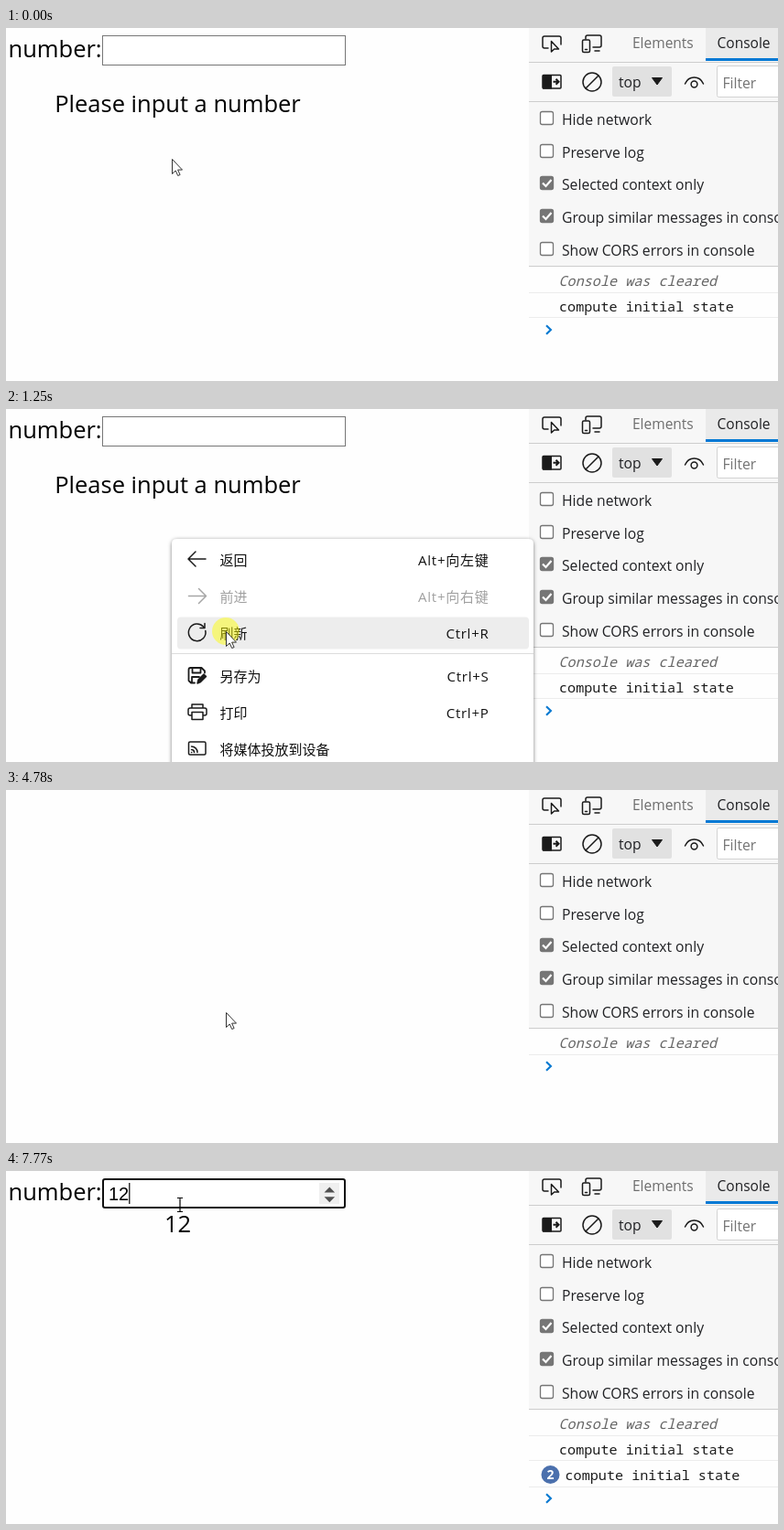
An HTML page that plays this animation: 843x386 px, repeating every 8 s.

```html
<!DOCTYPE html>
<html lang="en">
<head>
<meta charset="utf-8">
<title>Number input and console</title>
<style>
  html, body { margin: 0; width: 100%; height: 100%; overflow: hidden; background: #fefefe; }
  svg { display: block; width: 843px; height: 386px; font-family: "Open Sans", "Noto Sans", sans-serif; }
  text { white-space: pre; }
  .page { font-size: 25.5px; fill: #000; }
  .tool { font-size: 15.7px; fill: #202124; }
  .dim { fill: #6e6e6e; }
  .log { font: 15.15px "Noto Sans Mono", "DejaVu Sans Mono", monospace; fill: #1b1b1b; }
  .cleared { font-style: italic; fill: #666; }
  .label { font-size: 15px; font-family: "Noto Sans CJK SC", "Noto Sans CJK", sans-serif; }
  .keys { font-size: 15px; font-family: "Open Sans", "Noto Sans CJK SC", "Noto Sans CJK", sans-serif; letter-spacing: .75px; text-anchor: end; }
  .icon { fill: none; stroke: #1b1b1b; stroke-width: 1.5; stroke-linejoin: round; stroke-linecap: round; }
</style>
</head>
<body>
<svg viewBox="0 0 843 386" xmlns="http://www.w3.org/2000/svg">
  <defs>
    <filter id="shadow" x="-5%" y="-5%" width="110%" height="115%">
      <feDropShadow dx="0" dy="1" stdDeviation="2.2" flood-opacity=".5"/>
    </filter>
  </defs>
  <rect width="843" height="386" fill="#fefefe"/>

  <g id="form">
    <text class="page" x="2.5" y="32">number:</text>
    <rect id="field" fill="#fff"/>
    <g id="spinner">
      <rect x="342" y="13" width="22" height="23" fill="#efefef"/>
      <path d="M347.5 23.5l5.8-6 5.8 6zM347.5 28.2l5.8 6 5.8-6z" fill="#505050"/>
    </g>
    <text id="typed" x="112" y="32" font-size="20" font-family="Liberation Sans, Arial, sans-serif"></text>
    <rect id="caret" y="13" width="1.2" height="23"/>
  </g>
  <text id="output" class="page" x="187.5" text-anchor="middle"></text>

  <g id="tools">
    <rect x="571" width="272" height="261" fill="#f7f7f7"/>
    <rect x="764" width="79" height="36" fill="#eaeaea"/>
    <path d="M571 37.5h272M571 80.5h272M571 260.5h272" stroke="#cdcdcd"/>
    <rect x="764" y="33" width="79" height="3" fill="#0078d4"/>
    <text class="tool dim" x="684" y="22" style="font-size:15.5px">Elements</text>
    <text class="tool" x="776.5" y="22" style="font-size:15.5px">Console</text>
    <g class="icon">
      <path d="M592 22h-4q-2 0-2-2v-9q0-2 2-2h16q2 0 2 2v7"/>
      <path d="M595.5 14.5v11.5l3.2-3h4.8z" fill="#fff"/>
      <path d="M633 12v-2q0-2 2-2h13q2 0 2 2v9q0 2-2 2h-7M643 25h5"/>
      <rect x="629.5" y="13" width="8" height="13.5" rx="1.5"/>
      <path d="M632.5 23.5h2"/>
      <rect x="586" y="51.5" width="20" height="14.5" rx="1"/>
      <circle cx="640" cy="59" r="10"/>
      <path d="M633 66l14-14"/>
      <path d="M741.5 61q3-7 10-7t10 7"/>
      <circle cx="751.5" cy="61.5" r="3.4"/>
    </g>
    <rect x="586" y="51" width="10" height="15.5" fill="#1b1b1b"/>
    <path d="M597.5 58.8h6M600.5 55.8l3 3-3 3" fill="none" stroke="#1b1b1b" stroke-width="2"/>
    <rect x="662" y="42" width="65" height="33" rx="2" fill="#e1e1e1"/>
    <text class="tool" x="669" y="65">top</text>
    <path d="M705.5 54.5h11l-5.5 7.5z" fill="#1b1b1b" stroke="#1b1b1b" stroke-linejoin="round"/>
    <rect x="776.5" y="41.5" width="80" height="34" rx="2" fill="#fff" stroke="#d2d2d2"/>
    <text class="tool" x="782.5" y="65.5" style="fill:#757575">Filter</text>
  </g>

  <g id="console">
    <g id="rowCleared"><text class="log cleared" x="603.5" y="282">Console was cleared</text><path d="M571 289.5h272" stroke="#ececec"/></g>
    <g id="rowFirst"><text class="log" x="604" y="310">compute initial state</text><path d="M571 316.5h272" stroke="#ececec"/></g>
    <g id="rowSecond"><text id="second" class="log" y="338">compute initial state</text><path d="M571 345.5h272" stroke="#ececec"/></g>
    <g id="badge">
      <circle cx="594.5" cy="332" r="10" fill="#4b70ad"/>
      <text x="594.5" y="337" font-size="14" font-weight="700" fill="#fff" text-anchor="middle">2</text>
    </g>
    <path id="prompt" d="M590-4.7l4.9 4.7-4.9 4.7" fill="none" stroke-width="2.2"/>
  </g>

  <g id="menu">
    <path d="M181 400V148q0-6 6-6h383q6 0 6 6v252z" fill="#fff" filter="url(#shadow)"/>
    <rect id="hover" x="187" width="384" height="35" rx="4" fill="#ededed"/>
    <path d="M181 267.5h395" stroke="#dcdcdc"/>
    <g id="items"></g>
    <g class="icon">
      <path d="M218 164h-18.5M207 156l-8 8 8 8"/>
      <path d="M199.5 204.5h18.5M210.5 196.5l8 8-8 8" stroke="#a6a6a6"/>
      <path d="M215.5 238a9.3 9.3 0 1 0 2.3 4.5M217 234.5v5h-5"/>
      <path d="M206 299.5h-4l-2.5-2.5v-12q0-2 2-2h12l3.5 3.5v2M203.5 283.5v5h9v-5M203 299v-6h8" stroke-width="1.8"/>
      <path d="M209 300l1-4 6-6 2.500 2.500-6 6z" fill="#1b1b1b"/>
      <path d="M203 327v-4h12v4M203 335h-2q-2 0-2-2v-4q0-2 2-2h16q2 0 2 2v4q0 2-2 2h-2M203 331.500h12v8h-12z"/>
      <rect x="199.5" y="364" width="18.5" height="14" rx="1.5"/>
      <path d="M202.500 369a6.500 6.500 0 0 1 6.500 6.500M202.500 372.500a3 3 0 0 1 3 3M202.500 375.500h.3"/>
    </g>
  </g>

  <circle id="ring" r="15" fill="#ff0" fill-opacity=".47"/>
  <path id="arrow" d="M.5.5v16l3.700-3.500 2.500 5.500 2.400-1-2.500-5.400h4.900z" fill="#fff" stroke="#333"/>
  <path id="beam" d="M-3-7.500h2.500l.5.500.5-.5h2.500M0-7v14M-3 7.500h2.500l.5-.5.5.5h2.500" fill="none" stroke="#000" stroke-width="1.2"/>
</svg>

<script>
const LOOP = 8000;
const el = id => document.getElementById(id);
const show = (id, on) => { el(id).style.display = on ? "" : "none"; };
const set = (id, attrs) => { for (const k in attrs) el(id).setAttribute(k, attrs[k]); };
const within = (t, from, to) => t >= from && t < to;

function buildOptions() {
  const options = [
    ["Hide network", 99], ["Preserve log", 135], ["Selected context only", 170, true],
    ["Group similar messages in console", 206, true], ["Show CORS errors in console", 242]
  ];
  el("tools").innerHTML += options.map(([name, y, on]) => `
    <rect x="583.5" y="${y - 7.5}" width="14" height="14" rx="2" stroke="#767676" stroke-width="1.3" fill="${on ? "#767676" : "#fff"}"/>
    ${on ? `<path d="M586 ${y - .5}l3.5 3.5 6-7" fill="none" stroke="#fff" stroke-width="2.2"/>` : ""}
    <text class="tool" x="607" y="${y + 7}">${name}</text>`).join("");
}

function buildMenu() {
  const items = [
    ["返回", "Alt+向左键", 165], ["前进", "Alt+向右键", 205], ["刷新", "Ctrl+R", 245],
    ["另存为", "Ctrl+S", 291.5], ["打印", "Ctrl+P", 331.5], ["将媒体投放到设备", "", 371.5]
  ];
  el("items").innerHTML = items.map(([name, keys, y], i) => `
    <g fill="${i === 1 ? "#a0a0a0" : "#111"}">
      <text class="label" x="233.5" y="${y + 6}">${name}</text>
      <text class="keys" x="527.5" y="${y + 6}">${keys}</text>
    </g>`).join("");
}

// Pointer waypoints: time, x, y
const path = [
  [0, 181, 143], [700, 181, 143], [910, 210, 182], [1190, 240, 243],
  [5980, 240, 243], [6400, 222, 145], [6820, 190, 38], [6900, 190, 38], [6950, 190, 37]
];

// The pointer is sampled every 70 ms, like the recording of a screen
function pointerAt(t) {
  const step = 70;
  const clock = Math.max(0, Math.floor(t / step) * step);
  const i = path.findIndex(p => p[0] > clock);
  if (i < 0) return path[path.length - 1].slice(1);
  const [a, b] = [path[i - 1], path[i]];
  const k = (clock - a[0]) / (b[0] - a[0]);
  return [1, 2].map(n => Math.round(a[n] + (b[n] - a[n]) * k));
}

function promptY(t) {
  if (t < 2260) return 330;
  if (t < 4780) return 274;
  if (t < 5390) return 302;
  return t < 7280 ? 330 : 358;
}

function render(t) {
  const [x, y] = pointerAt(t);
  const loaded = t < 2780 || t >= 5320;
  const focused = t >= 6950;
  const overField = within(y, 8, 42) && t > 6000;
  const overText = within(y, 66, 99) && t > 6000;
  const digits = t < 7280 ? "" : t < 7770 ? "1" : "12";

  show("form", loaded);
  show("output", loaded);
  set("field", focused
    ? { x: 106, y: 9, width: 264, height: 31, rx: 2, stroke: "#101010", "stroke-width": 2 }
    : { x: 105.5, y: 8.5, width: 265, height: 32, rx: 0, stroke: overField ? "#333" : "#767676", "stroke-width": 1 });
  show("spinner", overField || focused);
  el("typed").textContent = digits;
  show("caret", t >= 7020);
  set("caret", { x: 112 + digits.length * 11.1 });
  el("output").textContent = digits || "Please input a number";
  set("output", { y: digits ? 67 : 92 });

  show("rowCleared", t < 2260 || t >= 4780);
  show("rowFirst", t < 2260 || t >= 5390);
  show("rowSecond", t >= 7280);
  show("badge", t >= 7770);
  set("second", { x: t < 7770 ? 604 : 610.5 });
  set("prompt", {
    transform: `translate(0 ${promptY(t)})`,
    stroke: within(t, 1530, 2260) ? "#6e7f91" : "#0b7ad1"
  });

  show("menu", within(t, 640, 1530));
  const row = Math.floor((y - 145) / 40);
  show("hover", row === 0 || row === 2);
  set("hover", { y: 147.5 + row * 40 });

  show("ring", within(t, 500, 570) || within(t, 1250, 1330) || within(t, 6950, 7020));
  set("ring", { cx: x, cy: y });
  const beam = overField || overText;
  show("arrow", !beam);
  show("beam", beam && !within(t, 7280, 7550));
  for (const id of ["arrow", "beam"]) set(id, { transform: `translate(${x} ${y})` });
}

function tick() {
  render(performance.now() % LOOP);
  requestAnimationFrame(tick);
}

buildOptions();
buildMenu();
tick();
</script>
</body>
</html>
```
